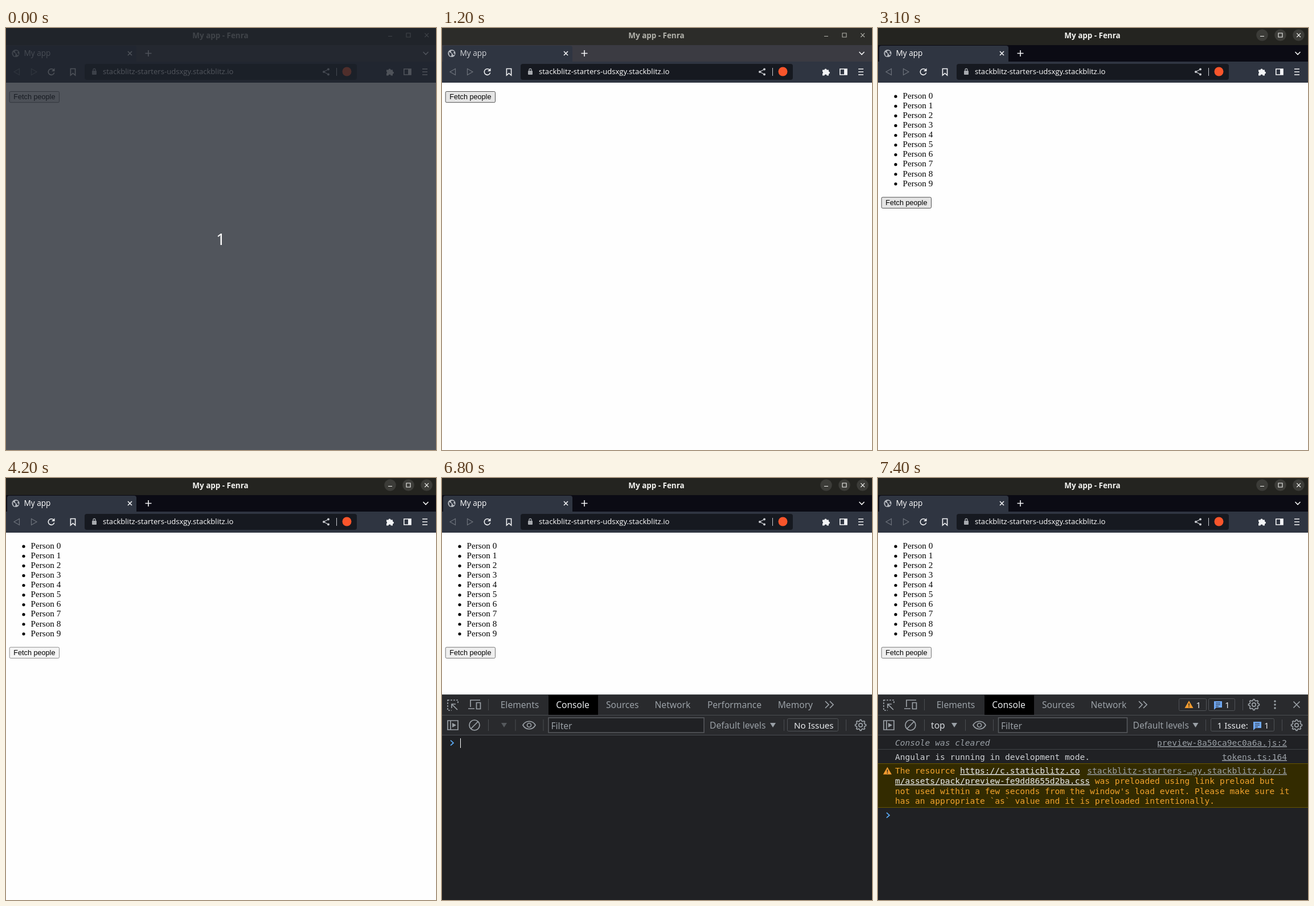
An HTML page for the animation above (8 s loop, 755x741 px).

```html
<!DOCTYPE html>
<html lang="en">
<head>
<meta charset="utf-8">
<title>My app</title>
<style>
  html, body { margin: 0; height: 100%; overflow: hidden; background: #fefefe; }
  svg { display: block; width: 100%; height: 100%; }
  text { white-space: pre; }
  .ui { font-family: "Open Sans", sans-serif; }
  .tools { font: 15.6px "Noto Sans", sans-serif; fill: #9aa0a6; }
  .mono { font: 14.57px "DejaVu Sans Mono", monospace; }
  .page { font: 15.2px "Liberation Serif", serif; }
  .line { fill: none; stroke: #9aa0a6; stroke-width: 1.7; }
  .white { fill: none; stroke: #f2f3f5; stroke-width: 1.6; }
  .sep { fill: none; stroke: #4a4d51; }
  .box { fill: none; stroke: #505357; }
  .lit { fill: #e8eaed; }
  .u { text-decoration: underline; }
  #frame { --bar: #2c2c29; --title: #b2b2ab; --strip: #3b3b42; --tab: #d3d5d9; --disc: none; }
  #frame.focus { --bar: #242420; --title: #f4f4f1; --strip: #0b0b14; --tab: #fff; --disc: #3c3c38; }
</style>
</head>
<body>
<svg viewBox="0 0 755 741" preserveAspectRatio="none">
  <defs>
    <g id="chat">
      <path d="M-7-6H7V5H-3L-7 9Z" fill="#70a9f5"/>
      <path d="M-4-3H4M-4 0H4M-4 3H1" stroke="#292a2d" stroke-width="1.2"/>
    </g>
    <g id="warn">
      <path d="M0-6.5L7.5 6.5H-7.5Z" fill="#f29b30"/>
      <path d="M0-2V2.4M0 3.6V5" stroke="#2b2718" stroke-width="1.5"/>
    </g>
    <path id="drop" d="M-5-4H5L0 4Z"/>
    <g id="eye" class="line">
      <path d="M-11 0C-6-9 6-9 11 0C6 9-6 9-11 0Z"/><circle r="3.5"/>
    </g>
    <path id="more" class="line" d="M-7-6L-1 0L-7 6M1-6L7 0L1 6"/>
    <g id="gear" class="line"><path id="teeth"/><circle r="3.2"/></g>
  </defs>

  <rect width="755" height="741" fill="#fefefe"/>

  <g id="frame" class="ui">
    <rect width="755" height="30" fill="var(--bar)"/>
    <text x="376.5" y="18" text-anchor="middle" font-size="13.45" font-weight="700" fill="var(--title)">My app - Fenra</text>
    <g fill="var(--disc)">
      <circle cx="674.5" cy="12.5" r="10.3"/><circle cx="706.5" cy="12.5" r="10.3"/><circle cx="738.5" cy="12.5" r="10.3"/>
    </g>
    <path d="M671 14.5H678M703 9H710V16H703ZM735.3 9.2L742 16M742 9.2L735.3 16" fill="none" stroke="var(--title)" stroke-width="1.1"/>

    <rect y="30" width="755" height="29" fill="var(--strip)"/>
    <path d="M2 59V35Q2 31 6 31H225Q229 31 229 35V59Z" fill="#2f3541"/>
    <circle cx="17" cy="44.5" r="6.6" fill="#b5b9bf"/>
    <path d="M12 42L17 45L16 50L13 48ZM17 39.5L21.5 41L20 44L23 46L20 48L18 44.5L15.5 42Z" fill="#2f3541"/>
    <text x="31.5" y="49" font-size="13.6" fill="var(--tab)">My app</text>
    <path class="white" d="M214 41L221 48M221 41L214 48M244.5 44.5H255.5M250 39V50M732.5 42L737 46.5L741.5 42"/>

    <rect y="59" width="755" height="37" fill="#2f3541"/>
    <path d="M23.5 71.5V82.5L14 77ZM44.5 71.5V82.5L54 77Z" fill="none" stroke="#6d727b" stroke-width="1.2"/>
    <path class="white" d="M83.5 73.5A5.3 5.3 0 1 0 84.7 78.4M113.4 71.5H121.6V83L117.5 79.5L113.4 83Z"/>
    <path d="M85.5 70.5V76H80Z" fill="#f2f3f5"/>
    <rect x="138" y="63" width="478" height="28" rx="4" fill="#161920"/>
    <rect x="151" y="75" width="8" height="7" rx="1" fill="#a6a9ae"/>
    <path d="M153 75V73.5A2 2 0 0 1 157 73.5V75" fill="none" stroke="#a6a9ae" stroke-width="1.3"/>
    <text x="170" y="81.3" font-size="13.1" fill="#fff">stackblitz-starters-udsxgy.stackblitz.io</text>
    <path d="M566 72.5L558 77L566 81.5" fill="none" stroke="#c9cbcf" stroke-width="1.2"/>
    <g fill="#c9cbcf">
      <circle cx="566" cy="72.5" r="2"/><circle cx="558" cy="77" r="2"/><circle cx="566" cy="81.5" r="2"/>
      <rect x="580" y="70" width="1" height="14"/>
    </g>
    <circle cx="598.5" cy="76.5" r="8" fill="#f9552b"/>
    <path d="M668 73.5H671.5A2 2 0 1 1 675.5 73.5H679V76.5A2 2 0 1 1 679 80.5V83.5H675.7A2 2 0 0 0 671.5 83.5H668V80A2 2 0 0 0 668 76.5Z" fill="#f2f3f5"/>
    <path class="white" d="M698.8 72H711V82H698.8ZM731 72H740M731 77H740M731 82H740"/>
    <rect x="706" y="72" width="5" height="10" fill="#f2f3f5"/>
  </g>

  <g id="list" class="page"></g>
  <g id="button">
    <rect id="face" x="6.2" y=".5" width="87.3" height="19.2" rx="2"/>
    <text x="49.9" y="14.4" text-anchor="middle" font-family="'Liberation Sans', sans-serif" font-size="12.65">Fetch people</text>
  </g>

  <g id="panel" class="tools">
    <rect y="380" width="755" height="361" fill="#202124"/>
    <rect y="380" width="755" height="72" fill="#292a2d"/>
    <path class="sep" d="M0 380.5H755M0 416.5H755M0 451.5H755M81.5 388V408M81.5 424V444M709.5 424V444"/>
    <rect x="187" y="381" width="87" height="35" fill="#000"/>
    <path class="line" d="M10 390H28V396M10 389V408H17" stroke-dasharray="3 2"/>
    <path class="line" d="M27 407L18 398M17 404V397H24"/>
    <path class="line" d="M50 402V390H67M46 405H57M60.5 394.5H67.5V405.5H60.5Z"/>
    <path class="line" d="M10 426H28V442H10ZM15 426V442"/>
    <path d="M18 430L25 434L18 438Z"/>
    <path class="line" d="M50.5 440.5L63.5 427.5"/><circle class="line" cx="57" cy="434" r="9"/>
    <text x="102.7" y="403.5">Elements</text>
    <text x="200.2" y="403.5" class="lit">Console</text>
    <text x="288" y="403.5">Sources</text>
    <text x="373.5" y="403.5">Network</text>
    <use href="#gear" x="735" y="434"/>

    <g id="early">
      <text x="465.9" y="403.5">Performance</text>
      <text x="589.7" y="403.5">Memory</text>
      <use href="#more" x="680" y="398"/>
      <use href="#drop" x="109" y="434" fill="#56595d"/>
      <use href="#eye" x="153" y="434"/>
      <path class="sep" d="M129 424V444M178 424V444M600.5 424V444"/>
      <rect x="187" y="421" width="273" height="26" fill="#202124" stroke="#55585c" stroke-width="1.6"/>
      <text x="191.5" y="440.5">Filter</text>
      <text x="470" y="439.5">Default levels</text>
      <use href="#drop" x="581" y="434"/>
      <rect class="box" x="606.5" y="422.5" width="89" height="22" rx="2"/>
      <text x="618" y="439.5" class="lit" font-size="15.2">No Issues</text>
    </g>

    <g id="late">
      <use href="#more" x="465" y="398"/>
      <rect class="box" x="528.5" y="387.5" width="48" height="21" rx="2"/>
      <rect class="box" x="580.5" y="387.5" width="46" height="21" rx="2"/>
      <use href="#warn" x="546" y="397.5"/>
      <use href="#chat" x="597" y="398"/>
      <text x="558.5" y="403.5" class="lit" font-size="15">1</text>
      <text x="609" y="403.5" class="lit" font-size="15">1</text>
      <use href="#gear" x="660" y="398"/>
      <circle cx="697" cy="392" r="1.8"/><circle cx="697" cy="398" r="1.8"/><circle cx="697" cy="404" r="1.8"/>
      <path class="line" d="M729.5 392.5L740.5 403.5M740.5 392.5L729.5 403.5"/>
      <text x="93" y="439.5" fill="#d5d8dc">top</text>
      <use href="#drop" x="134" y="434"/>
      <use href="#eye" x="178" y="434"/>
      <path class="sep" d="M640.5 388V408M153.5 424V444M202.5 424V444M575.5 424V444"/>
      <rect x="211.5" y="421" width="226" height="26" fill="#202124" stroke="#55585c" stroke-width="1.6"/>
      <text x="216" y="440.5">Filter</text>
      <text x="447.5" y="439.5">Default levels</text>
      <use href="#drop" x="557.5" y="434"/>
      <rect class="box" x="584.5" y="422.5" width="111" height="22" rx="2"/>
      <text x="595.5" y="439.5" class="lit" font-size="15.2">1 Issue:</text>
      <use href="#chat" x="666" y="434"/>
      <text x="678" y="439.5" class="lit" font-size="15">1</text>
    </g>

    <g id="logs" class="mono">
      <path class="sep" d="M0 476.5H755" stroke-opacity=".8"/>
      <text x="30" y="470" font-style="italic">Console was cleared</text>
      <text x="718" y="470" text-anchor="end" class="u">preview-8a50ca9ec0a6a.js:2</text>
      <text x="30" y="494.5" fill="#d0d3d6">Angular is running in development mode.</text>
      <text x="718" y="494.5" text-anchor="end" class="u">tokens.ts:164</text>
      <rect y="501" width="755" height="78" fill="#332b00"/>
      <path d="M0 501.5H755M0 578.5H755" stroke="#665500"/>
      <use href="#warn" x="16.5" y="514"/>
      <text x="718" y="519" text-anchor="end" class="u">stackblitz-starters-…gy.stackblitz.io/:1</text>
      <g fill="#f2a32c">
        <text x="30" y="519">The resource <tspan class="lit u">https://c.staticblitz.co</tspan></text>
        <text x="30" y="537"><tspan class="lit u">m/assets/pack/preview-fe9dd8655d2ba.css</tspan> was preloaded using link preload but</text>
        <text x="30" y="554.5">not used within a few seconds from the window's load event. Please make sure it</text>
        <text x="30" y="572">has an appropriate `as` value and it is preloaded intentionally.</text>
      </g>
    </g>

    <g id="prompt">
      <path d="M15 460.7L20 465.2L15 469.7" fill="none" stroke="#5aa9f2" stroke-width="1.8"/>
      <rect id="caret" x="32" y="457" width="1" height="17" fill="#fff"/>
    </g>
  </g>

  <g id="count">
    <rect width="755" height="741" fill="rgb(29,34,43)" fill-opacity=".77"/>
    <text x="377" y="381" text-anchor="middle" font-family="'Noto Sans', sans-serif" font-size="28" fill="#fff">1</text>
  </g>
</svg>
<script>
const LOOP = 8000;
const el = id => document.getElementById(id);
const show = (id, on) => { el(id).style.display = on ? "" : "none"; };

// [fill, border] of the button
const faces = {
  idle: ["#efefef", "#767676"],
  hover: ["#e5e5e5", "#4f4f4f"],
  press: ["#f5f5f5", "#8d8d8d"]
};
const pointer = [
  [0, "idle"], [1200, "hover"], [1600, "press"], [1800, "idle"],
  [3100, "hover"], [3400, "press"], [3600, "hover"],
  [4200, "press"], [4400, "hover"], [5000, "idle"]
];

el("list").innerHTML = Array.from({ length: 10 }, (_, i) => {
  const y = 124 + i * 17.07;
  return `<circle cx="31" cy="${y - 3.8}" r="2.6"/><text x="43.6" y="${y}">Person ${i}</text>`;
}).join("");

el("teeth").setAttribute("d", "M" + Array.from({ length: 32 }, (_, i) => {
  const r = i % 4 < 2 ? 9.5 : 7.3;
  const a = (i - 0.5) * Math.PI / 16;
  return (r * Math.cos(a)).toFixed(2) + " " + (r * Math.sin(a)).toFixed(2);
}).join("L") + "Z");

function draw(t) {
  const loaded = t >= 1800;
  const logged = t >= 6900;
  const settled = t >= 7000;
  const [fill, stroke] = faces[pointer.findLast(([start]) => t >= start)[1]];

  show("count", t < 100);
  el("frame").classList.toggle("focus", t >= 1600);
  show("list", loaded);
  el("button").setAttribute("transform", `translate(0 ${loaded ? 296.7 : 111})`);
  el("face").setAttribute("fill", fill);
  el("face").setAttribute("stroke", stroke);

  show("panel", t >= 6800);
  show("early", !settled);
  show("late", settled);
  show("logs", logged);
  el("prompt").setAttribute("transform", `translate(0 ${logged ? 127 : 0})`);
  show("caret", t < 7400);
}

const begin = performance.now();
function tick() {
  draw((performance.now() - begin) % LOOP);
  requestAnimationFrame(tick);
}
tick();
</script>
</body>
</html>
```
